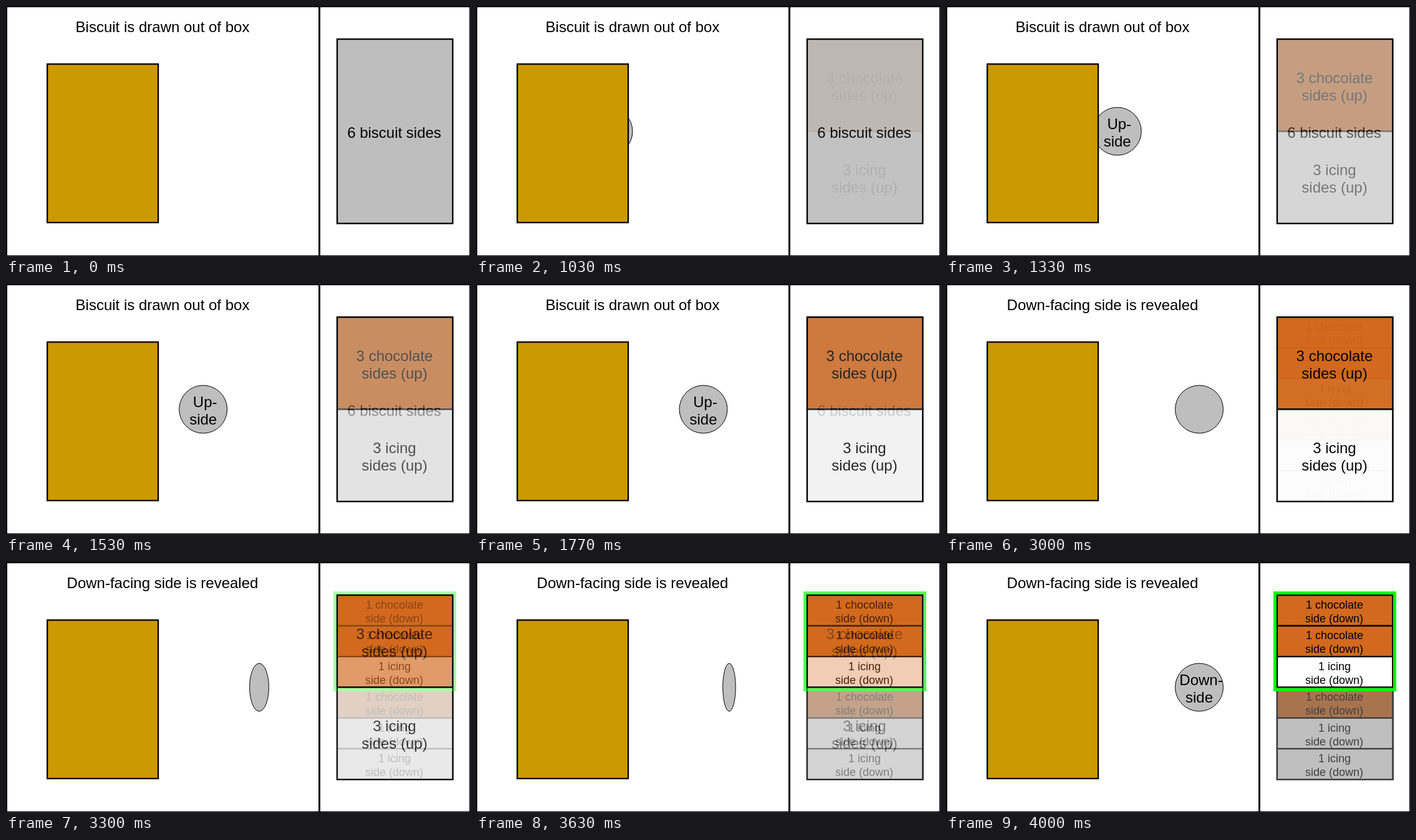
These frames come from a looping animation (744x402 px, 6000 ms). An HTML page:

```html
<!DOCTYPE html>
<html lang="en">
<head>
<meta charset="utf-8">
<title>Biscuit box</title>
<style>
  html, body { margin: 0; width: 100%; height: 100%; overflow: hidden; background: #fff; }
  svg { display: block; width: 744px; height: 402px; }
  text { font: 24px "Liberation Sans", Arial, sans-serif; text-anchor: middle; }
  .small { font-size: 18px; }
  .edge { stroke: #000; stroke-width: 2.3; }
</style>
</head>
<body>
<svg id="stage" viewBox="0 0 744 402" xmlns="http://www.w3.org/2000/svg"></svg>
<script>
const NS = 'http://www.w3.org/2000/svg';
const stage = document.getElementById('stage');
const GREY = '#bebebe', CHOC = '#d2691e', WHITE = '#fff';
const LOOP = 6000;

function add(parent, tag, attrs = {}, text = '') {
  const el = document.createElementNS(NS, tag);
  for (const key in attrs) el.setAttribute(key, attrs[key]);
  if (text) el.textContent = text;
  parent.appendChild(el);
  return el;
}

const group = parent => add(parent, 'g');
const label = (parent, x, y, text, cls = '') => add(parent, 'text', { x, y, class: cls }, text);
const box = (parent, x, y, width, height, fill) =>
  add(parent, 'rect', { x, y, width, height, fill, class: 'edge' });

// Sample space panel on the right
const PANEL = { x: 531, y: 53.3, w: 185.3, h: 296.4, mid: 623 };

function rows(parent, fills) {
  const h = PANEL.h / fills.length;
  fills.forEach((fill, i) => box(parent, PANEL.x, PANEL.y + i * h, PANEL.w, h, fill));
  return h;
}

function buildWhole(parent) {
  rows(parent, [GREY]);
  label(parent, 622.5, 212, '6 biscuit sides');
}

function buildHalves(parent) {
  const h = rows(parent, [CHOC, WHITE]);
  ['3 chocolate', '3 icing'].forEach((name, i) => {
    label(parent, PANEL.mid, 124 + i * h, name);
    label(parent, PANEL.mid, 152 + i * h, 'sides (up)');
  });
}

function buildSixths(parent) {
  const fills = [CHOC, CHOC, WHITE, CHOC, WHITE, WHITE];
  const h = rows(parent, fills);
  fills.forEach((fill, i) => {
    label(parent, PANEL.mid, 75 + i * h, fill === CHOC ? '1 chocolate' : '1 icing', 'small');
    label(parent, PANEL.mid - 0.5, 97 + i * h, 'side (down)', 'small');
  });
  add(parent, 'rect', { x: 529.8, y: 201.5, width: 187.7, height: 149.4, fill: '#808080', 'fill-opacity': 0.5 });
  add(parent, 'rect', { x: 527.5, y: 49.8, width: 192, height: 155.7, fill: 'none', stroke: '#0f0', 'stroke-width': 5 });
}

add(stage, 'rect', { width: 744, height: 402, fill: WHITE });

// Disc sits behind the biscuit box
const disc = group(stage);
const face = add(disc, 'ellipse', { cy: 201.5, ry: 38.5, fill: GREY, stroke: '#000', 'stroke-width': 1 });
const word = label(disc, 3, 198, 'Up-');
const side = label(disc, 0, 226, 'side');

box(stage, 66.2, 93.4, 177.8, 254.8, '#c90');
const title = label(stage, 251, 42, '');

const whole = group(stage), halves = group(stage), sixths = group(stage);
buildWhole(whole);
buildHalves(halves);
buildSixths(sixths);

// Outer frame and divider
add(stage, 'path', { d: 'M0 0H744V402H0ZM2 2V401H743V2Z', 'fill-rule': 'evenodd' });
add(stage, 'rect', { x: 501, width: 3, height: 402 });

const clamp = v => Math.min(1, Math.max(0, v));

// Index at 30 steps per second, with step times rounded to 10 ms
function stepAt(t) {
  const rest = t % 100;
  return 3 * Math.floor(t / 100) + (rest >= 70 ? 2 : rest >= 30 ? 1 : 0);
}

function draw(t) {
  const n = stepAt(t);
  const drawn = n < 31 ? 0 : clamp((n - 29) / 30);
  const shown = clamp((n - 89) / 30);
  const flip = clamp((n - 90) / 30);

  title.textContent = n < 90 ? 'Biscuit is drawn out of box' : 'Down-facing side is revealed';
  disc.setAttribute('transform', `translate(${198.7 + 207.3 * drawn} 0)`);
  face.setAttribute('rx', Math.max(0.01, 38.5 * Math.abs(1 - 2 * flip)));

  const named = n < 90 || n >= 120 ? 'visible' : 'hidden';
  word.textContent = n < 90 ? 'Up-' : 'Down-';
  word.setAttribute('visibility', named);
  side.setAttribute('visibility', named);

  halves.setAttribute('opacity', drawn);
  sixths.setAttribute('opacity', shown);
}

const start = performance.now();
function tick() {
  draw((performance.now() - start) % LOOP);
  requestAnimationFrame(tick);
}
draw(0);
requestAnimationFrame(tick);
</script>
</body>
</html>
```
